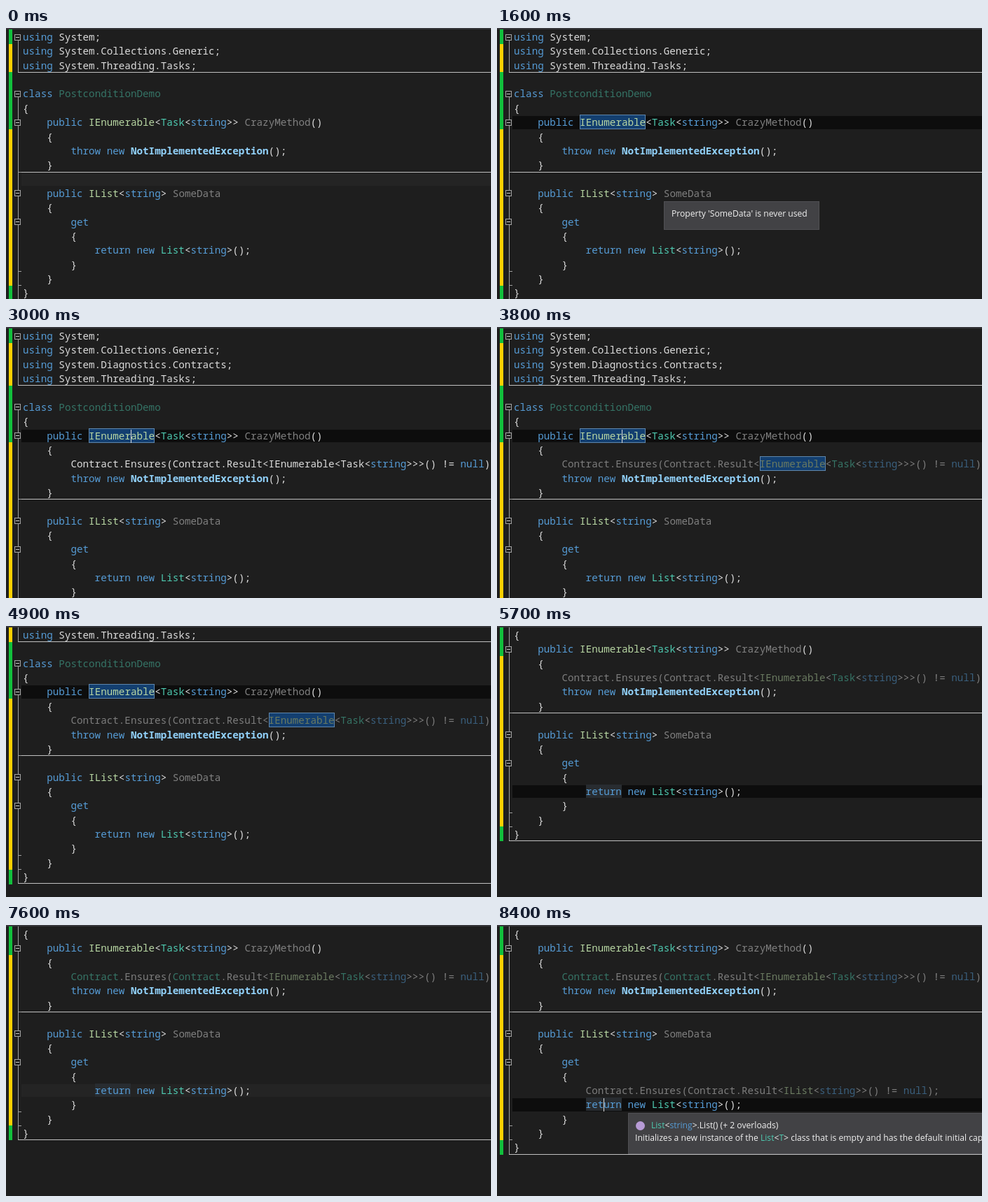
These frames come from a looping animation (692 px wide and 388 px high, 9000 ms). An HTML page:

```html
<!DOCTYPE html>
<html lang="en">
<head>
<meta charset="utf-8">
<title>Code editor</title>
<style>
  html, body { margin: 0; width: 692px; height: 388px; overflow: hidden; background: #1e1e1e; }
  #stage {
    --text: #dcdcdc; --key: #569cd6; --type: #4ec9b0; --iface: #b8d7a3; --grey: #808080;
    position: relative; width: 692px; height: 388px; overflow: hidden;
    color: var(--text); font: 14.25px/20.36px "Noto Sans Mono", monospace;
  }
  #stage::before { content: ""; position: absolute; inset: 0 0 auto; height: 2px; background: #38383c; }
  #code { position: absolute; inset: 2px 0 0; overflow: hidden; }
  .row { position: absolute; left: 0; width: 100%; height: 20.36px; white-space: pre; }
  .row > * { position: absolute; }
  .bar { left: 4px; top: -.6px; width: 5px; height: 21px; }
  .line { left: 17px; top: 0; bottom: 0; width: 1px; background: #a0a0a0; }
  .line.start { top: 10px; }
  .fold { left: 12px; top: 5.5px; width: 7px; height: 7px; border: 1px solid #a5a5a5; background: #1e1e1e; }
  .fold::after { content: ""; position: absolute; left: 1px; top: 3px; width: 5px; height: 1px; background: #d0d0d0; }
  .tick { left: 17px; bottom: 0; width: 5px; height: 1px; background: #a0a0a0; }
  .sep { left: 22px; right: 0; bottom: 0; height: 1px; background: #c0c0c0; z-index: 1; }
  .sep.full { left: 17px; }
  .now { left: 22px; right: 0; top: 1px; bottom: 1px; background: #242424; }
  .now.focus { background: #0d0d0d; }
  .src { left: 24px; top: 0; }
  .caret { top: 1px; width: 1px; height: 19px; background: #dcdcdc; }

  .k { color: var(--key); }
  .c { color: var(--type); }
  .i { color: var(--iface); }
  .u { color: var(--grey); }
  .d { color: #357466; }
  .b { color: #92d2fb; font-weight: bold; }
  .dim { --text: #7d7d7d; --key: #3a5f7d; --type: #367466; --iface: #6b7b61; color: var(--text); }
  .fresh { --type: #dcdcdc; --iface: #dcdcdc; }
  .hit { padding: 1px 0; background: #133f70; box-shadow: inset 0 0 0 1px #5f86ab; }
  .soft { background: #282c30; }

  .tip {
    position: absolute; box-sizing: border-box; display: none; white-space: pre; z-index: 2;
    background: #424245; border: 1px solid #505054; color: #f1f1f1;
    font: 12.15px/18px "Open Sans", sans-serif;
  }
  .tip.on { display: block; }
  #unused { left: 238px; top: 248px; width: 222px; height: 41px; padding: 8px 10px; }
  #info { left: 187px; top: 269px; width: 530px; height: 59px; padding: 8px 9px; }
  #info div:first-child { padding-left: 23px; }
  #info i { position: absolute; left: 10px; top: 11px; width: 13px; height: 13px; border-radius: 50%; background: #b79bd6; }
</style>
</head>
<body>
<div id="stage">
  <div id="code"></div>
  <div class="tip" id="unused">Property 'SomeData' is never used</div>
  <div class="tip" id="info"><div><i></i><span class="c">List</span>&lt;<span class="k">string</span>&gt;.List() (+ 2 overloads)</div><div>Initializes a new instance of the <span class="c">List</span>&lt;<span class="c">T</span>&gt; class that is empty and has the default initial capacity.</div></div>
</div>
<script>
const LOOP = 9000, PITCH = 20.36, CHAR = 8.55, LEFT = 24, TOP = 1;
const GREEN = '#12c03c', YELLOW = '#ffd000';
const AT = {
  selectMethod: 1000, markType: 1300, menuA: 2000, fixA: 2700, dimA: 3300, markBoth: 3600,
  scrollA: 4400, scrollB: 5100, selectReturn: 5400, markReturn: 5600, resolveA: 6100,
  menuB: 6500, fixB: 7700, dimB: 8000
};
const CARET = [[1000, 1500], [2800, 3300], [3800, 4300], [5400, 5700], [6100, 6500], [7700, 8000], [8300, 9000]];

const WORDS = [
  ['k', 'using|class|public|throw|new|get|return|string|null'],
  ['b', 'NotImplementedException'],
  ['d', 'PostconditionDemo'],
  ['u', 'CrazyMethod|SomeData'],
  ['i', 'IEnumerable|IList'],
  ['c', 'Task|List|Contract']
];
const kindOf = {};
for (const [kind, list] of WORDS) for (const word of list.split('|')) kindOf[word] = kind;
const wordRe = new RegExp('\\b(' + WORDS.map(w => w[1]).join('|') + ')\\b', 'g');

const code = document.getElementById('code');
const within = (t, a, b) => t >= a && t < b;

function paint(row) {
  return row.text.replace(/</g, '&lt;').replace(wordRe, word => {
    let kind = kindOf[word];
    if (word === 'Contract' && !row.resolved) kind = '';
    if (row.mark === word) kind += ' ' + (word === 'return' ? 'soft' : 'hit');
    return `<span class="${kind}">${word}</span>`;
  });
}

function buildRows(t) {
  const rows = [];
  const add = (text, bar, extra) => rows.push({ text, bar, line: 'mid', ...extra });
  const ensures = (indent, type, dimAt, extra) =>
    add(`${indent}Contract.Ensures(Contract.Result<${type}>() != null);`, YELLOW,
      { tone: t >= dimAt ? 'dim' : 'fresh', ...extra });
  const atMethod = within(t, AT.selectMethod, AT.selectReturn);
  const atReturn = t >= AT.selectReturn;
  const in1 = '    ', in2 = in1 + in1, in3 = in2 + in1;

  add('using System;', GREEN, { fold: true, line: 'start' });
  add('using System.Collections.Generic;', YELLOW);
  if (t >= AT.fixA) add('using System.Diagnostics.Contracts;', YELLOW);
  add('using System.Threading.Tasks;', YELLOW, { sep: 'full' });
  add('', GREEN, { line: '' });
  add('class PostconditionDemo', GREEN, { fold: true, line: 'start' });
  add('{', GREEN);
  add(in1 + 'public IEnumerable<Task<string>> CrazyMethod()', GREEN, {
    fold: true, now: atMethod, caret: 18,
    mark: within(t, AT.markType, AT.selectReturn) && 'IEnumerable'
  });
  add(in1 + '{', YELLOW);
  if (t >= AT.fixA) ensures(in2, 'IEnumerable<Task<string>>', AT.dimA, {
    resolved: t >= AT.resolveA,
    mark: within(t, AT.markBoth, AT.selectReturn) && 'IEnumerable'
  });
  add(in2 + 'throw new NotImplementedException();', YELLOW);
  add(in1 + '}', YELLOW, { tick: true, sep: 'part' });
  add('', YELLOW, { now: t < AT.selectMethod });
  add(in1 + 'public IList<string> SomeData', YELLOW, { fold: true });
  add(in1 + '{', YELLOW);
  add(in2 + 'get', YELLOW, { fold: true });
  add(in2 + '{', YELLOW);
  if (t >= AT.fixB) ensures(in3, 'IList<string>', AT.dimB);
  add(in3 + 'return new List<string>();', YELLOW, {
    now: atReturn, caret: 15, mark: t >= AT.markReturn && 'return'
  });
  add(in2 + '}', YELLOW, { tick: true });
  add(in1 + '}', YELLOW, { tick: true });
  add('}', GREEN, { sep: 'full' });
  return rows;
}

function rowHtml(row, y, focus, blink) {
  const box = (cls, style = '') => `<div class="${cls}" style="${style}"></div>`;
  let html = '';
  if (row.now) html += box(focus ? 'now focus' : 'now');
  html += box('bar', `background:${row.bar}`);
  if (row.line) html += box('line ' + row.line);
  if (row.fold) html += box('fold');
  if (row.tick) html += box('tick');
  if (row.sep) html += box('sep ' + row.sep);
  html += `<div class="src ${row.tone || ''}">${paint(row)}</div>`;
  if (row.now && row.caret && blink) html += box('caret', `left:${LEFT + CHAR * row.caret}px`);
  return `<div class="row" style="top:${y}px">${html}</div>`;
}

let shown = '';
function frame() {
  const t = performance.now() % LOOP;
  const focus = t >= AT.selectMethod && !within(t, AT.menuA, AT.fixA) && !within(t, AT.menuB, AT.fixB);
  const blink = CARET.some(([a, b]) => within(t, a, b));
  const scroll = t >= AT.scrollB ? 6 : t >= AT.scrollA ? 3 : 0;
  const html = buildRows(t).map((row, n) => rowHtml(row, TOP + (n - scroll) * PITCH, focus, blink)).join('');
  if (html !== shown) code.innerHTML = shown = html;
  document.getElementById('unused').classList.toggle('on', within(t, 1500, 1900));
  document.getElementById('info').classList.toggle('on', t >= AT.dimB);
  requestAnimationFrame(frame);
}
frame();
</script>
</body>
</html>
```
